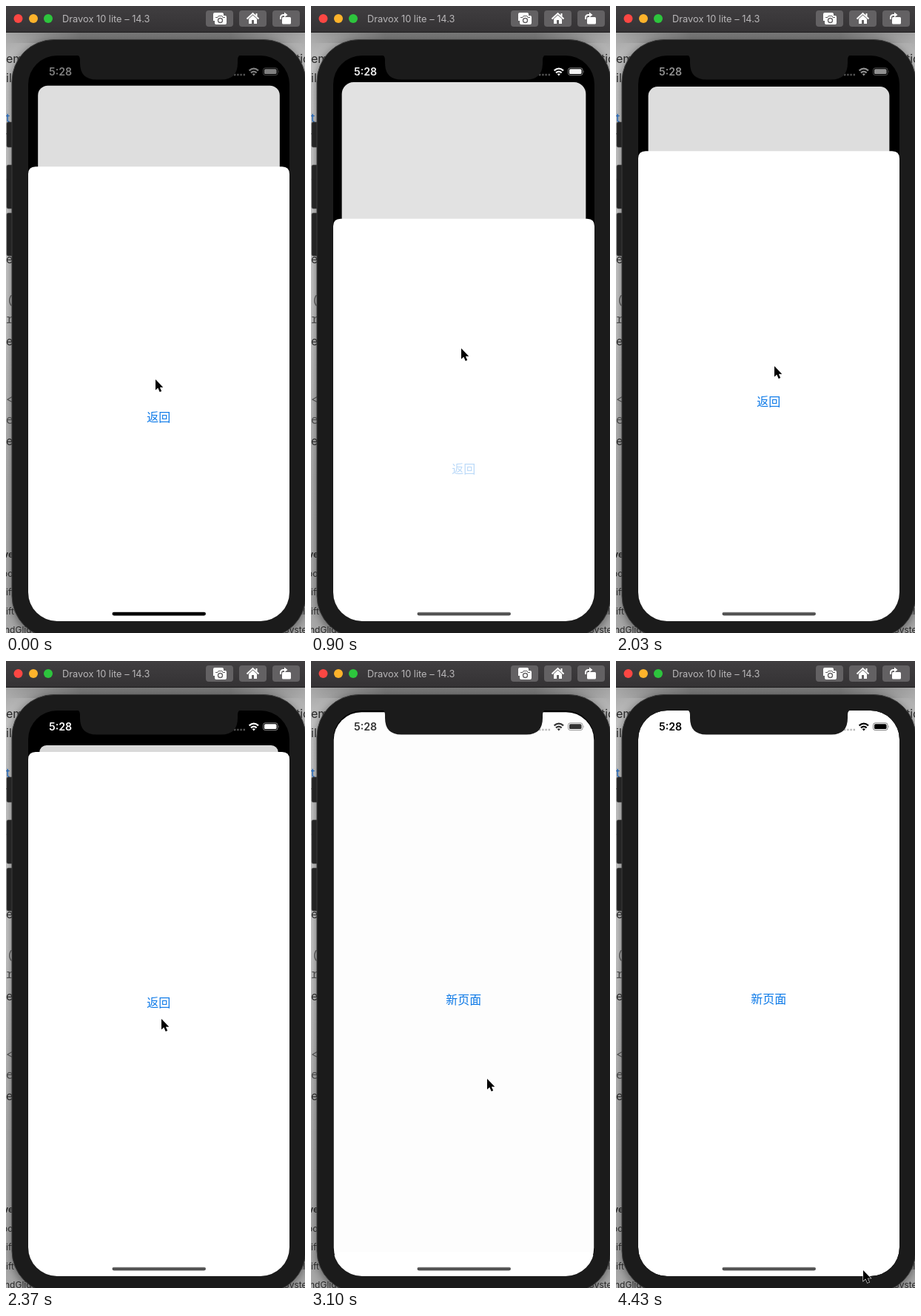
An HTML page that plays this animation: 404x848 px, repeating every 4460 ms.

```html
<!DOCTYPE html>
<html lang="zh">
<head>
<meta charset="utf-8">
<title>Sheet transition</title>
<style>
  html, body { margin: 0; width: 100%; height: 100%; overflow: hidden; background: #aaa; }
  svg { display: block; width: 404px; height: 848px; }
  .ui { font-family: Inter, "Liberation Sans", sans-serif; }
  .label { font: 16px "Noto Sans CJK SC", "Noto Sans CJK", sans-serif; fill: #0b79e8; text-anchor: middle; }
  .doc { font: 16px Inter, sans-serif; fill: #292929; }
  .code { font-family: "Noto Sans Mono", monospace; fill: #494949; }
  .small { font-size: 12px; }
  .glyph { fill: none; stroke: #fff; stroke-width: 2; }
</style>
</head>
<body>
<svg viewBox="0 0 404 848">
  <defs>
    <linearGradient id="desk" x2="0" y2="1">
      <stop offset="0" stop-color="#8d8d8d"/>
      <stop offset=".1" stop-color="#c4c4c4"/>
      <stop offset=".45" stop-color="#c6c6c6"/>
      <stop offset=".75" stop-color="#adadad"/>
      <stop offset="1" stop-color="#a6a6a6"/>
    </linearGradient>
    <linearGradient id="strip" x2="1" y2="0">
      <stop offset="0" stop-color="#555" stop-opacity="0"/>
      <stop offset=".25" stop-color="#555" stop-opacity=".6"/>
      <stop offset=".75" stop-color="#555" stop-opacity=".6"/>
      <stop offset="1" stop-color="#555" stop-opacity="0"/>
    </linearGradient>
    <linearGradient id="bar" x2="0" y2="1">
      <stop offset="0" stop-color="#403e40"/>
      <stop offset="1" stop-color="#343234"/>
    </linearGradient>
    <linearGradient id="grip" x2="0" y2="1">
      <stop offset="0" stop-color="#8a8a8a"/>
      <stop offset=".5" stop-color="#444"/>
      <stop offset="1" stop-color="#686868"/>
    </linearGradient>
    <filter id="blur" x="-20%" width="140%"><feGaussianBlur stdDeviation="6"/></filter>
    <clipPath id="glass"><rect x="30" y="67" width="353" height="765" rx="39"/></clipPath>
  </defs>

  <rect width="404" height="848" fill="url(#desk)"/>
  <rect y="36" width="404" height="14" fill="url(#strip)"/>
  <rect x="7" y="48" width="398" height="810" rx="56" opacity=".4" filter="url(#blur)"/>

  <g class="doc">
    <text y="77">em</text><text y="103">il</text>
    <text y="157" fill="#1c62b5">t</text><text y="184">\</text>
    <text y="239">e</text><text y="319">r</text><text y="348">e</text>
    <text y="459">e</text><text y="594">e</text>
    <text x="392" y="77">tic</text>
    <g class="code">
      <text x="1" y="403">(</text><text y="429">r</text>
      <text y="538">&lt;</text><text y="565">e</text>
    </g>
    <g class="small">
      <text x="-4" y="746" font-weight="700">ve</text><text x="-5" y="772">oo</text>
      <text y="797">ift</text><text y="823">ift</text><text x="-2" y="848">ndGlider</text>
      <text x="394" y="823">dl</text><text x="375" y="848">Syste</text>
    </g>
  </g>

  <g fill="#242424" stroke="#4a4a4a" stroke-width=".6">
    <rect x="1" y="157" width="9" height="34" rx="2"/>
    <rect x="1" y="215" width="9" height="59" rx="2"/>
    <rect x="1" y="280" width="9" height="58" rx="2"/>
  </g>
  <rect x="8" y="45.5" width="397" height="809" rx="57" fill="#1b1b1b" stroke="#3b3b3b"/>

  <g clip-path="url(#glass)">
    <rect x="30" y="67" width="353" height="765"/>
    <g id="card">
      <rect id="page" x="30" y="67" width="353" height="765" fill="#fff"/>
      <text id="open" class="label" x="206.2" y="463">新页面</text>
      <rect id="dim" x="30" y="67" width="353" height="765"/>
    </g>
    <g id="status" class="ui">
      <text x="58" y="94" font-size="14.2" font-weight="600" textLength="">5:28</text>
      <path d="M308 93h15" stroke="#8c8c8c" stroke-width="2.4" stroke-dasharray="2.4 1.8" opacity=".6"/>
      <g fill="none" stroke="currentColor" stroke-width="2.3">
        <path d="M328.6 87.4q6.2-5.6 12.4 0M331 90.3q3.8-3.4 7.6 0"/>
      </g>
      <path d="M332.7 92.1q2.1-1.8 4.2 0l-2.1 2.3z" fill="currentColor"/>
      <rect x="347.5" y="83.8" width="19.5" height="9.8" rx="2.8" fill="none" stroke="currentColor" stroke-opacity=".5"/>
      <rect x="349" y="85.3" width="16.5" height="6.8" rx="1.6" fill="currentColor"/>
      <path d="M368.3 87v3.4q1.4-1.7 0-3.4" fill="currentColor" opacity=".5"/>
    </g>
    <g id="sheet">
      <path d="M30 760V10q0-10 10-10H373q10 0 10 10V760z" fill="#fff"/>
      <text id="back" class="label" x="206.2" y="344.5">返回</text>
    </g>
    <rect id="home" x="143.5" y="819.7" width="126.5" height="4.8" rx="2.4"/>
  </g>
  <path d="M94 66q6 0 6 7v4q0 22.500 22 22.500H291q22 0 22-22.500v-4q0-7 6-7z" fill="#1b1b1b"/>

  <rect width="404" height="36" fill="url(#bar)"/>
  <rect y="35" width="404" height="1" fill="#1d1c1d"/>
  <circle cx="16.500" cy="17" r="6" fill="#fc4743"/>
  <circle cx="37" cy="17" r="6" fill="#fdb32b"/>
  <circle cx="57" cy="17" r="6" fill="#2dc53d"/>
  <text class="ui" x="76" y="22" font-size="12.800" fill="#b9b7b9">Dravox 10 lite – 14.3</text>
  <g fill="#636163">
    <rect x="270" y="6" width="37" height="22" rx="4"/>
    <rect x="315" y="6" width="37" height="22" rx="4"/>
    <rect x="360" y="6" width="37" height="22" rx="4"/>
  </g>
  <path d="M282 9h10q2 0 2 2v2h2q2 0 2 2v8q0 2-2 2h-12q-2 0-2-2v-3h-2v-9q0-2 2-2z" fill="#fff"/>
  <path d="M283 15.500h3l1-2h5l1 2h3" fill="none" stroke="#636163"/>
  <circle cx="289.500" cy="19.500" r="3" fill="none" stroke="#636163" stroke-width="1.400"/>
  <path class="glyph" d="M325.500 17.500l8-7.500 8 7.500M338.500 10v4"/>
  <path d="M328 17.500l5.500-5 5.500 5V24h-4v-5h-3v5h-4z" fill="#fff"/>
  <rect x="373" y="15" width="12" height="9.500" rx="1.500" fill="#fff"/>
  <path class="glyph" d="M371 18v-2q0-4 4-4h2" stroke-width="1.600"/>
  <path d="M376 8.500l4.500 3.500-4.500 3.500z" fill="#fff"/>

  <path id="cursor" d="M0 0V14.500L3.300 11.600 5.700 17 8.200 15.900 5.900 10.700H10.300Z" stroke="#fff" stroke-width="1.100" paint-order="stroke"/>
</svg>
<script>
  const LOOP = 4460, FRAME = 1000 / 30;
  const FULL_TOP = 832, SHEET_TOP = 121.5;
  // Sheet moves: start time, target state, spring rate per second, settle time
  const moves = [
    { at: -260, to: 1, rate: 13.5, end: 800 },
    { at: 846, to: 0, rate: 17, end: 1125 },
    { at: 1750, to: 1, rate: 13.5, end: 2700 },
    { at: 2815, to: 0, rate: 17, end: 3350 }
  ];
  // Pointer stops: time, x, y
  const stops = [
    [0, 202, 505], [180, 202, 500], [620, 203, 463], [1000, 203, 463],
    [1130, 211, 459], [1760, 211, 459], [2030, 214, 487], [2370, 210, 484],
    [2640, 208, 466], [2840, 210, 468], [3100, 238, 565],
    [3540, 331, 829], [3820, 333, 825], [4030, 334, 824]
  ];

  const $ = id => document.getElementById(id);
  const [card, page, open, dim, status, sheet, back, home, cursor] =
    ['card', 'page', 'open', 'dim', 'status', 'sheet', 'back', 'home', 'cursor'].map($);
  const clamp = v => Math.min(1, Math.max(0, v));
  const smooth = v => v * v * (3 - 2 * v);
  const mix = (a, b, k) => a + (b - a) * k;
  const spring = x => 1 - (1 + x) * Math.exp(-x);

  function pressOpacity(t, release) {
    if (t < release - 90) return 1;
    return mix(.28, 1, clamp((t - release - 70) / 300));
  }

  function pointerAt(t) {
    const i = stops.findIndex(s => s[0] > t);
    if (i < 0) return stops[stops.length - 1].slice(1);
    const a = stops[i - 1], b = stops[i];
    const k = smooth((t - a[0]) / (b[0] - a[0]));
    return [mix(a[1], b[1], k), mix(a[2], b[2], k)];
  }

  function render(t) {
    const move = moves.filter(m => m.at <= t).pop();
    const age = t - move.at;
    const done = t >= move.end ? 1 : spring(age / 1000 * move.rate);
    const p = move.to ? done : 1 - done;

    const scale = 1 - .0864 * p;
    card.setAttribute('transform',
      `translate(${206.5 * (1 - scale)} ${67 + 47 * p - 67 * scale}) scale(${scale})`);
    for (const shape of [page, dim]) shape.setAttribute('rx', mix(39, 10.5, p));
    dim.setAttribute('opacity', .15 * p);
    sheet.setAttribute('transform', `translate(0 ${mix(FULL_TOP, SHEET_TOP, p)})`);

    const fade = smooth(clamp(age / (move.to ? 520 : 400)));
    const tone = Math.round(255 * (move.to ? fade : 1 - fade));
    status.style.color = status.style.fill = `rgb(${tone},${tone},${tone})`;

    open.setAttribute('opacity', pressOpacity(t, 1740));
    back.setAttribute('opacity', t < 1700 ? pressOpacity(t, 840) : pressOpacity(t, 2810));
    home.setAttribute('fill', t < 850 ? '#000' : 'url(#grip)');
    cursor.setAttribute('transform', `translate(${pointerAt(t)})`);
  }

  function tick() {
    const t = performance.now() % LOOP;
    render(Math.floor(t / FRAME + .2) * FRAME);
    requestAnimationFrame(tick);
  }
  tick();
</script>
</body>
</html>
```
